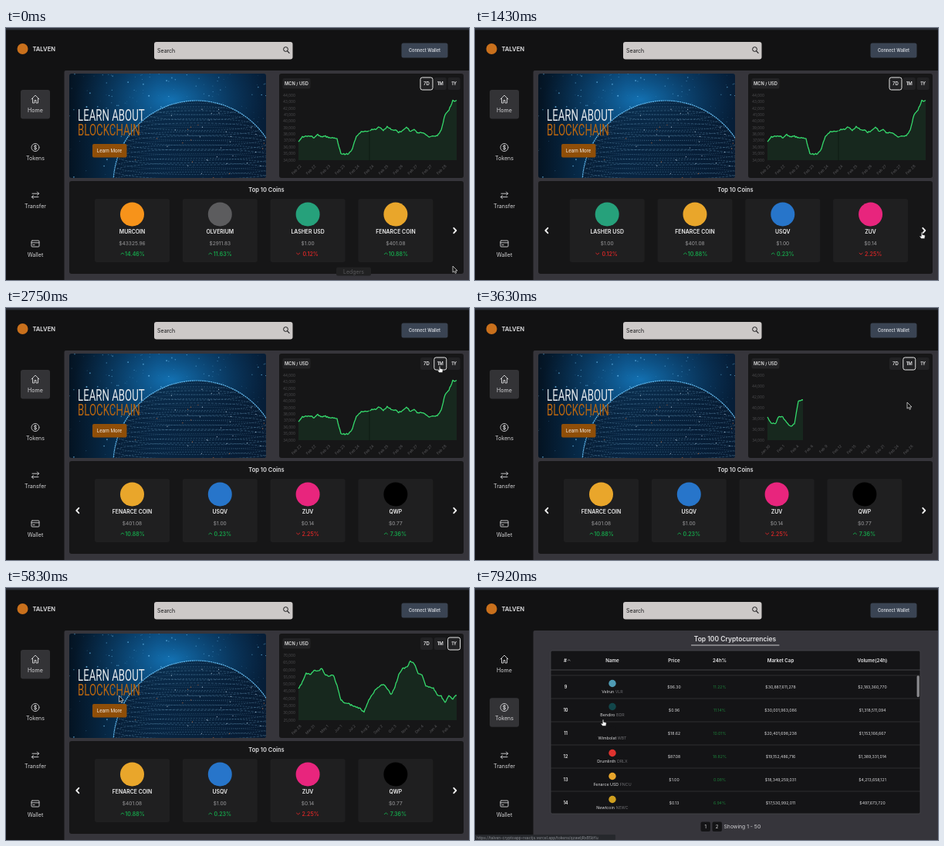
These frames come from a looping animation (600x326 px, 8000 ms). An HTML page:

```html
<!DOCTYPE html>
<html lang="en">
<head>
<meta charset="utf-8">
<title>Crypto dashboard</title>
<style>
html, body { margin: 0; width: 100%; height: 100%; overflow: hidden; background: #121213; }
svg { display: block; width: 100%; height: 100%; font-family: Inter, sans-serif; }
.narrow { font-family: Roboto, sans-serif; }
</style>
</head>
<body>
<svg id="stage" viewBox="0 0 600 326"></svg>
<script>
const LOOP = 8000;
const GREEN = '#16a34a', RED = '#d02626', AMBER = '#d9720f';
const $ = id => document.getElementById(id);

// Markup helpers
const rect = (x, y, w, h, fill, r = 0, more = '') =>
  `<rect x="${x}" y="${y}" width="${w}" height="${h}" rx="${r}" fill="${fill}" ${more}/>`;
const circle = (x, y, r, fill, more = '') => `<circle cx="${x}" cy="${y}" r="${r}" fill="${fill}" ${more}/>`;
const text = (x, y, size, fill, str, weight = 400, anchor = 'middle', more = '') =>
  `<text x="${x}" y="${y}" font-size="${size}" fill="${fill}" font-weight="${weight}" text-anchor="${anchor}" ${more}>${str}</text>`;
const line = (d, color, width = 1, more = '') =>
  `<path d="${d}" fill="none" stroke="${color}" stroke-width="${width}" stroke-linecap="round" stroke-linejoin="round" ${more}/>`;
const clip = (id, x, y, w, h, r = 0) => `<clipPath id="${id}">${rect(x, y, w, h, '#000', r)}</clipPath>`;

// Math helpers
const clamp = v => Math.max(0, Math.min(1, v));
const mix = (a, b, k) => a + (b - a) * k;
function random(seed) {
  return () => (seed = (seed * 16807) % 2147483647) / 2147483647;
}
// cubic-bezier(.25, .1, .25, 1)
function ease(x) {
  if (x <= 0 || x >= 1) return clamp(x);
  const curve = (a, b, s) => 3 * a * s * (1 - s) ** 2 + 3 * b * s * s * (1 - s) + s ** 3;
  let lo = 0, hi = 1;
  for (let i = 0; i < 20; i++) {
    const mid = (lo + hi) / 2;
    if (curve(.25, .25, mid) < x) lo = mid; else hi = mid;
  }
  return curve(.1, 1, lo);
}

// Data
const COINS = [
  ['MURCOIN', '$43325.96', 14.46, '#f7931a'],
  ['OLVERIUM', '$2911.83', 11.63, '#5c5c5e'],
  ['LASHER USD', '$1.00', -0.12, '#26a17b'],
  ['FENARCE COIN', '$401.08', 10.88, '#e9a62b'],
  ['USQV', '$1.00', 0.23, '#2775ca'],
  ['ZUV', '$0.14', -2.25, '#e8257d'],
  ['QWP', '$0.77', 7.36, '#000'],
  ['PALLEN', '$90.12', 13.37, '#2b5fc4']
];
const ROWS = [
  ['Murcoin', 'MCN', '$43,325.96', '14.46%', '$821,940,206,371', '$38,316,204,118', '#f7931a'],
  ['Olverium', 'OLV', '$2,911.83', '11.63%', '$348,217,530,962', '$17,842,771,305', '#5c5c5e'],
  ['Lasher USD', 'LSHU', '$1.00', '-0.12%', '$79,480,113,627', '$65,204,881,940', '#26a17b'],
  ['Fenarce Coin', 'FNC', '$401.08', '10.88%', '$66,923,408,115', '$2,511,630,872', '#e9a62b'],
  ['USQV', 'USQV', '$1.00', '0.23%', '$53,318,264,709', '$4,102,776,318', '#2775ca'],
  ['Zuv', 'ZUV', '$0.14', '-2.25%', '$49,170,825,336', '$18,204,511', '#e8257d'],
  ['Qwp', 'QWP', '$0.77', '7.36%', '$36,914,207,580', '$2,870,113,406', '#000'],
  ['Pallen', 'PLLN', '$90.12', '13.37%', '$33,705,918,244', '$3,940,227,615', '#2b5fc4'],
  ['Velrun', 'VLR', '$96.30', '11.22%', '$30,887,611,278', '$2,183,360,770', '#4f9cb5'],
  ['Bendiro', 'BDR', '$0.96', '11.14%', '$30,001,963,086', '$1,318,511,094', '#12464a'],
  ['Wimbolat', 'WBT', '$18.62', '10.01%', '$20,401,698,238', '$1,153,166,667', '#141416'],
  ['Drumlinth', 'DRLX', '$87.08', '18.82%', '$19,152,486,716', '$1,389,331,014', '#e0332f'],
  ['Fenarce USD', 'FNCU', '$1.00', '0.08%', '$18,349,259,031', '$4,213,658,121', '#e9a62b'],
  ['Newtcoin', 'NEWC', '$0.13', '6.94%', '$17,530,992,011', '$497,673,720', '#cf9f1f']
];
const CHARTS = [
  { top: 44, low: 34, step: 1, gap: 18.8, wobble: 1.6,
    dates: 'Feb 22,Feb 22,Feb 23,Feb 23,Feb 24,Feb 24,Feb 25,Feb 26,Feb 27,Feb 27,Feb 28',
    ys: [148, 141, 140, 139, 142, 138, 141, 140, 142, 142, 144, 163, 163, 163, 156, 140, 135, 133, 134, 131, 131,
      128, 132, 128, 131, 132, 135, 133, 128, 134, 132, 136, 135, 138, 141, 140, 139, 132, 112, 106, 94, 94] },
  { top: 46, low: 34, step: 2, gap: 18.5, wobble: 2,
    dates: 'Jan 30,Feb 1,Feb 4,Feb 6,Feb 9,Feb 12,Feb 15,Feb 18,Feb 21,Feb 24,Feb 26',
    ys: [142, 149, 150, 140, 141, 149, 153, 149, 121, 119, 118, 117, 105, 102, 99, 104, 94, 106, 108, 116, 114,
      113, 102, 99, 101, 103, 118, 126, 130, 128, 138, 140, 150, 144, 140, 162, 148, 136, 138, 144, 140, 106] },
  { top: 70, low: 25, step: 5, gap: 17.6, wobble: 2,
    dates: 'Feb 28,Mar 31,May 1,Jun 1,Jul 2,Aug 2,Sept 2,Oct 3,Nov 3,Dec 4,Jan 4,Feb 4',
    ys: [131, 122, 110, 112, 107, 108, 104, 112, 114, 112, 126, 145, 148, 150, 152, 154, 156, 160, 148, 138, 132,
      127, 124, 130, 138, 128, 112, 104, 103, 95, 98, 110, 113, 126, 128, 130, 138, 140, 148, 139, 144, 138] }
];
const SUB = 4, LEFT = 379, BOTTOM = 171;
CHARTS.forEach((c, n) => {
  const rnd = random(77 + n * 31);
  c.path = [];
  for (let i = 0; i <= 41 * SUB; i++) {
    const k = Math.min(40, Math.floor(i / SUB));
    c.path.push(mix(c.ys[k], c.ys[k + 1], i / SUB - k) + (rnd() - .5) * c.wobble);
  }
});

// Static pieces
function banner() {
  const rnd = random(42);
  let s = rect(82, 59, 255, 135, 'url(#sky)') + rect(82, 59, 255, 135, 'url(#glow)');
  const speck = (x, y, r, o, color) => circle(x.toFixed(1), y.toFixed(1), r.toFixed(2), color, `opacity="${o.toFixed(2)}"`);
  for (let i = 0; i < 170; i++)
    s += speck(82 + 255 * rnd(), 59 + 135 * rnd() ** 1.4, .3 + .7 * rnd() ** 2, .25 + .55 * rnd(), '#6fc3f5');
  s += '<ellipse cx="247" cy="202" rx="108" ry="108" fill="#071a30" fill-opacity=".72" stroke="#5fb8ee" stroke-width="1.2" stroke-dasharray="2 .7"/>';
  for (let k = 0; k < 17; k++) {
    const y = 101 + k * 6, rx = 108 * Math.sqrt(1 - ((202 - y) / 108) ** 2);
    s += `<ellipse cx="247" cy="${y}" rx="${rx.toFixed(1)}" ry="${(rx * .1).toFixed(1)}" fill="none" stroke="#8fcdf3" stroke-width=".5" stroke-dasharray="${1 + k % 3} 1.6" opacity=".5"/>`;
  }
  for (let i = 0; i < 45; i++) {
    const a = rnd() * Math.PI, d = 105 * Math.sqrt(rnd());
    s += speck(247 + d * Math.cos(a), 200 - d * Math.sin(a), .6, .8, i % 3 ? '#d8ecfa' : '#e0783c');
  }
  return `<g clip-path="url(#bannerClip)">${s}</g>` +
    `<g class="narrow" transform="translate(93 0) scale(.68 1)">
      ${text(0, 120, 19.5, '#e4e8ec', 'LEARN ABOUT', 400, 'start')}
      ${text(0, 139, 19.5, '#b9660f', 'BLOCKCHAIN', 400, 'start')}</g>` +
    rect(112, 150, 44.5, 17.5, '#8f4e08', 2) +
    `<g class="narrow" transform="translate(134 0) scale(.8 1)">${text(0, 161.3, 8, '#f0e6da', 'Learn More')}</g>`;
}

function card([name, price, change, color], i) {
  const x = 163.5 + i * 113.8, up = change > 0, tone = up ? GREEN : RED;
  return rect(x - 48.5, 221, 97, 82, '#1f1f20', 3) + circle(x, 241, 15.5, color) +
    text(x, 266, 6.9, '#eee', name, 600) + text(x, 281.3, 6.6, '#9a9a9c', price) +
    line(up ? `M${x - 14.5} 292.6l2-1.7 2 1.7` : `M${x - 14.5} 291.2l2 1.7 2-1.7`, tone) +
    text(x + 3.5, 294.7, 7, tone, Math.abs(change).toFixed(2) + '%', 600);
}

function axis(c, n) {
  let s = '';
  const count = (c.top - c.low) / c.step;
  for (let i = 0; i <= count; i++)
    s += text(375, 89 + i * 83.5 / count, 4.7, '#4d4d50', `${c.top - i * c.step},000`, 400, 'end');
  c.dates.split(',').forEach((d, i) => {
    const x = 383 + i * c.gap;
    s += text(x, 179, 4.8, '#5a5a5d', d, 400, 'end', `transform="rotate(-45 ${x} 179)"`);
  });
  return `<g id="axis${n}">${s}</g>`;
}

function tableRow([name, sym, price, pct, cap, vol, color], i) {
  const y = 121 + i * 30;
  const cell = (x, str, fill = '#d8d8da') => text(x, y + 2, 5.2, fill, str);
  return text(117.5, y + 2, 5.6, '#eee', i + 1, 600) + circle(178, y - 4.5, 4.7, color) +
    text(178, y + 8, 5.3, '#d8d8da', `${name} <tspan fill="#6c6c70">${sym}</tspan>`) +
    cell(258, price) + cell(317, pct, pct[0] === '-' ? '#a32020' : '#1c7d38') + cell(396, cap) + cell(515, vol) +
    line(`M98 ${y + 15}H577`, '#3a3a3e', .7);
}

const NAV = [
  ['Home', 'M33 92l5-5 5 5M34.5 91v6h2.5v-3.5h2v3.5h2.5v-6'],
  ['Tokens', 'M43 154.5a5 5 0 1 1-10 0a5 5 0 1 1 10 0M39.8 152.8c-.7-1-3.4-.9-3.4.5 0 1.6 3.4.8 3.4 2.5 0 1.4-2.8 1.4-3.6.2M38 151.4v6.2'],
  ['Transfer', 'M34 214.2h8.5M40.5 212l2.2 2.2-2.2 2.2M42 218.6h-8.5M35.5 216.4l-2.2 2.2 2.2 2.2'],
  ['Wallet', 'M34 275h8a1 1 0 0 1 1 1v6a1 1 0 0 1-1 1h-8a1 1 0 0 1-1-1v-6a1 1 0 0 1 1-1M33 277.8h10M35 280.6h2']
];
const nav = NAV.map(([name, d], i) =>
  line(d, '#d4d4d6', .9) + text(38, 109 + i * 62.2, 7.1, '#d4d4d6', name)).join('');

const HEADS = [[117, '#'], [178, 'Name'], [258, 'Price'], [317, '24h%'], [396, 'Market Cap'], [515, 'Volume(24h)']];
const RANGES = ['7D', '1M', '1Y'];
const pill = (x, label) => rect(x, 302.5, 12.5, 12.5, '#141416', 2) + text(x + 6.2, 311.2, 6, '#ddd', label);

$('stage').innerHTML = `
<defs>
  <linearGradient id="sky"><stop offset="0" stop-color="#041322"/><stop offset=".45" stop-color="#0a4576"/><stop offset="1" stop-color="#061d36"/></linearGradient>
  <radialGradient id="glow" cx=".52" cy=".25" r=".5"><stop offset="0" stop-color="#1681c8" stop-opacity=".75"/><stop offset="1" stop-color="#0a3b66" stop-opacity="0"/></radialGradient>
  ${clip('bannerClip', 82, 59, 255, 135, 3)}${clip('slideClip', 106.6, 215, 455.4, 95)}
  ${clip('rowsClip', 98, 106.5, 479, 185)}
  <clipPath id="plotClip"><rect id="reveal" x="${LEFT - 1}" y="80" width="0" height="92"/></clipPath>
</defs>
${rect(0, 0, 600, 326, '#121213')}${rect(0, 0, 600, 2.5, '#2b2e37')}
<path d="M75.5 326V57q0-2 2-2H600V326Z" fill="#36353b"/>
${circle(21.5, 27, 7, '#c9701c')}
${text(34.5, 30, 7.6, '#e6e6e8', 'TALVEN', 600, 'start')}
${rect(192, 18, 179.5, 22.5, '#cdc9c8', 3)}${text(196, 32, 7, '#18181a', 'Search', 400, 'start')}
${circle(362.5, 27.5, 2.9, 'none', 'stroke="#18181a" stroke-width="1"')}${line('M364.7 29.8l2.4 2.5', '#18181a', 1.1)}
${rect(512.5, 19.5, 60, 19, '#3a4453', 2.5)}${text(542.5, 31, 5.6, '#cfd3d9', 'Connect Wallet', 600)}
<rect id="active" x="19" width="38" height="37.5" rx="3" fill="#333336"/>${nav}
<g id="home">
  ${banner()}
  ${rect(354, 59, 239, 135, '#161617', 3)}
  ${rect(358.5, 65, 36, 13.5, '#232325', 2)}${text(376.5, 74, 5.7, '#ddd', 'MCN / USD', 600)}
  ${RANGES.map((r, i) => rect(537 + i * 17.8, 64, 16, 16, '#222224', 2.5, `id="range${i}"`) +
    text(545 + i * 17.8, 74.2, 6, '#e4e4e6', r, 600)).join('')}
  ${CHARTS.map(axis).join('')}
  <g clip-path="url(#plotClip)"><path id="area" fill="#22c55e" fill-opacity=".1"/><path id="curve" fill="none" stroke="#35d96c" stroke-width="1.3" stroke-linejoin="round"/></g>
  ${line('M471 132V171', '#0f1a13', 1, 'id="marker"')}
  ${rect(82, 198, 511, 120, '#161617', 3)}
  ${text(337.5, 212.3, 7.5, '#dcdcde', 'Top 10 Coins', 600)}
  <g clip-path="url(#slideClip)"><g id="slides">${COINS.map(card).join('')}</g></g>
  ${line('M94.3 258.8l-3 3.2 3 3.2', '#f2f2f2', 1.9, 'id="prev"')}
  ${line('M580.3 258.8l3 3.2-3 3.2', '#f2f2f2', 1.9)}
  <g id="hint">${rect(428, 309.5, 45, 11, '#212122', 2)}${text(450.5, 317.5, 7, '#58585b', 'Ledgers')}</g>
</g>
<g id="tokens">
  ${text(337, 69, 8.5, '#e2e2e4', 'Top 100 Cryptocurrencies', 600)}${line('M280.5 74H394', '#c9c9cc', 1)}
  ${rect(98, 81, 479, 211, '#141416', 2, 'stroke="#45454a" stroke-width=".8"')}
  ${HEADS.map(([x, h]) => text(x, 95.8, 6.2, '#e8e8ea', h, 600)).join('')}
  ${line('M120.4 93.9l1.4-1.2 1.4 1.2', '#aaa', .8)}
  <g clip-path="url(#rowsClip)"><g id="rows">${ROWS.map(tableRow).join('')}</g></g>
  ${line('M98 106H577', '#48484c', .9)}
  ${rect(572.6, 81, 3.2, 28, '#8b8b8e', 1.6, 'id="thumb"')}
  ${circle(338.3, 154.3, 6.4, 'none', `id="spinner" stroke="${AMBER}" stroke-width="4.4"`)}
  ${pill(292.5, '1')}${pill(307.5, '2')}${text(322.5, 311.2, 6.8, '#d0d0d3', 'Showing 1 - 50', 400, 'start')}
</g>
<g id="status">${rect(0, 319, 200, 7, '#26282c', 1, 'id="statusBox"')}${text(2, 325.4, 5, '#8d9096', '', 400, 'start', 'id="url"')}</g>
<g id="arrow"><path d="M0 0V8.2L1.9 6.5 3.2 9.3 4.6 8.7 3.4 6H6Z" fill="#111" stroke="#eee" stroke-width=".7"/></g>
<g id="hand"><path d="M-.8.6Q0-.6.8.6V3.2L3.6 3.9Q4.4 4.2 4.3 5L3.7 8.6H-.8L-3 5.6Q-2.6 4.3-.8 5.4Z" fill="#f4f4f4" stroke="#111" stroke-width=".6"/></g>`;

// Timeline
const SLIDES = [560, 1090, 1700];
const PICKS = [0, 2600, 4400];
const LOADS = [-2000, 3380, 4510];
const OPEN = 6380, LOADED = 6950;
const POINTER = [[150, 579, 308], [330, 579, 264], [2050, 579, 264], [2550, 562, 75], [3000, 562, 75],
  [3350, 560, 122], [4050, 560, 122], [4400, 580, 71], [5300, 580, 71], [6050, 34, 157], [6750, 34, 157], [7150, 166, 170]];
const HANDS = [[300, 2150], [2500, 3050], [4350, 5350], [5950, 6800], [7080, 8000]];
const SITE = 'https://talven-cryptoapp-reactjs.vercel.app/tokens';

const show = (id, on) => $(id).setAttribute('display', on ? 'inline' : 'none');
const set = (id, name, value) => $(id).setAttribute(name, value);
const latest = (times, t) => times.filter(s => t >= s).length - 1;

function pointer(t) {
  const n = POINTER.findIndex(p => p[0] > t);
  if (n <= 0) return POINTER[n ? POINTER.length - 1 : 0].slice(1);
  const [a, b] = [POINTER[n - 1], POINTER[n]];
  const u = (t - a[0]) / (b[0] - a[0]), k = u * u * (3 - 2 * u);
  return [mix(a[1], b[1], k), mix(a[2], b[2], k)];
}

function drawChart(t) {
  const n = latest(LOADS, t);
  const morph = n === 2 ? ease((t - 4980) / 700) : 1;
  const from = CHARTS[Math.max(0, n - 1)].path, to = CHARTS[n].path;
  const d = 'M' + to.map((y, i) =>
    `${LEFT + i * 5 / SUB} ${mix(from[i], y, morph).toFixed(1)}`).join('L');
  set('curve', 'd', d);
  set('area', 'd', `${d}V${BOTTOM}H${LEFT}Z`);
  set('reveal', 'width', 1 + 207 * ease((t - LOADS[n]) / 1500));
  CHARTS.forEach((c, i) => show('axis' + i, i === n));
  show('marker', n === 0);
  const pick = latest(PICKS, t);
  RANGES.forEach((r, i) => set('range' + i, 'stroke', i === pick ? '#e8e8e8' : 'none'));
}

function render(t) {
  const onTokens = t >= OPEN;
  show('home', !onTokens);
  show('tokens', onTokens);
  set('active', 'y', onTokens ? 142.3 : 80);
  if (onTokens) {
    const scroll = 233 * ease((t - 7200) / 680);
    set('rows', 'transform', `translate(0 ${-scroll})`);
    set('thumb', 'y', 81 + scroll * 211 / 1530);
    ['rows', 'thumb'].forEach(id => show(id, t >= LOADED));
    show('spinner', t < LOADED);
  } else {
    const shift = SLIDES.reduce((sum, s) => sum + ease((t - s) / 500), 0);
    set('slides', 'transform', `translate(${-113.8 * shift} 0)`);
    show('prev', t >= SLIDES[0]);
    show('hint', t < 220);
    drawChart(t);
  }
  const onRow = t >= 7080;
  show('status', t >= 6050 && t < 6800 || onRow);
  set('statusBox', 'width', onRow ? 182 : 200);
  $('url').textContent = SITE + (onRow ? '/qzawljRxB5bYu' : '');
  const [x, y] = pointer(t), hand = HANDS.some(([a, b]) => t >= a && t < b);
  show('hand', hand);
  show('arrow', !hand);
  set(hand ? 'hand' : 'arrow', 'transform', `translate(${x} ${y})`);
}

const start = performance.now();
function tick() {
  render((performance.now() - start) % LOOP);
  requestAnimationFrame(tick);
}
tick();
</script>
</body>
</html>
```
